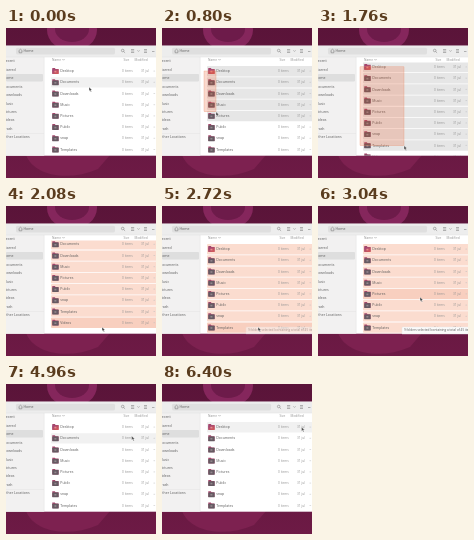
Recreate the animation shown at these times as an HTML page. Size 150 by 150 pixels, loop 6.48 s.

```html
<!DOCTYPE html>
<html lang="en">
<head>
<meta charset="utf-8">
<title>File selection</title>
<style>
  html, body { margin: 0; width: 100%; height: 100%; overflow: hidden; background: #5a1439; }
  svg { display: block; width: 100vw; height: 100vh; }
  text { font-family: "Open Sans", "Noto Sans", sans-serif; font-size: 3.5px; fill: #5a5a5a; }
  .dim { fill: #929292; font-size: 3.2px; }
  .line { fill: none; stroke: #707070; stroke-width: .5; }
</style>
</head>
<body>
<svg viewBox="0 0 150 150">
  <defs>
    <linearGradient id="wall" x2="0" y2="1">
      <stop stop-color="#5a1439"/>
      <stop offset="1" stop-color="#6d1a45"/>
    </linearGradient>
    <linearGradient id="warm" x2="1" y2="1">
      <stop stop-color="#97447a"/>
      <stop offset="1" stop-color="#dc5c55"/>
    </linearGradient>
    <clipPath id="view"><rect x="38" y="34.5" width="112" height="93"/></clipPath>
  </defs>

  <rect width="150" height="150" fill="url(#wall)"/>
  <ellipse cx="66" cy="2" rx="25" ry="21" fill="#85265c"/>
  <ellipse cx="66" cy="1" rx="17" ry="13" fill="#6d1b4a"/>
  <path d="M20 127C28 148 62 154 92 141L104 127Z" fill="#7d2150"/>

  <rect y="17.7" width="150" height="110" fill="#fff"/>
  <rect y="17.7" width="150" height="11.3" fill="#ededed"/>
  <rect y="29" width="38" height="98.7" fill="#f2f1f1"/>
  <path d="M0 29H150M38.2 29V127.7" stroke="#dcdcdc" stroke-width=".5"/>
  <g id="side"></g>

  <g clip-path="url(#view)"><g id="list"></g></g>
  <text class="dim" x="46" y="33">Name</text>
  <text class="dim" x="117.5" y="33">Size</text>
  <text class="dim" x="128.5" y="33">Modified</text>
  <path class="line" d="M56.5 31.2l1 1 1-1"/>

  <rect x="10" y="19.8" width="99" height="6.6" rx="1.5" fill="#dfdfdf"/>
  <path class="line" d="M12.5 23l2-1.8 2 1.8M13.2 22.8v2h2.6v-2"/>
  <text x="17.5" y="24.3">Home</text>
  <circle class="line" cx="116.7" cy="22.5" r="1.3"/>
  <path class="line" d="M117.7 23.5l1.4 1.4M125 21.5h3.2M125 23h3.2M125 24.5h3.2M131.5 22.4l1 1 1-1M138 21.5h3M138 23h3M138 24.5h3M146 23.5h2.5"/>

  <rect id="band" x="42" fill="#e95420" fill-opacity=".22" stroke="#e98a66" stroke-width=".3"/>
  <g id="status">
    <path d="M84 128v-6q0-1 1-1h66v7z" fill="#fafafa" stroke="#e2e2e2" stroke-width=".4"/>
    <text x="86" y="125.3" style="font-size:3.1px">9 folders selected (containing a total of 45 items)</text>
  </g>
  <path id="cursor" d="M0 0V4.2L1 3.3 1.8 5 2.6 4.6 1.8 3H3.1Z" fill="#444" stroke="#fff" stroke-width=".4"/>
</svg>
<script>
const LOOP = 6480, STEP = 80, TOP = 37.6, PITCH = 11.2;
const DRAG = 320, DROP = 1960, CLEAR = 3760;
const $ = id => document.getElementById(id);
const set = (id, attrs) => Object.entries(attrs).forEach(([k, v]) => $(id).setAttribute(k, v));

const linear = u => u;
const easeIn = u => u * u;
const easeOut = u => 1 - (1 - u) ** 2;
const smooth = u => u * u * (3 - 2 * u);
const ramp = (t, from, to, ease = linear) => ease(Math.min(1, Math.max(0, (t - from) / (to - from))));

// Each leg of the pointer's way adds its own eased offset
const pointerX = t => 83 - 41 * ramp(t, 0, DRAG, smooth)
  + 28 * ramp(t, DRAG, 1440) + 26 * ramp(t, 1440, DROP)
  + 24 * ramp(t, 2720, 3360, easeIn) - 12 * ramp(t, 3360, 3600, easeOut)
  + 31.5 * ramp(t, 3840, 5840);
const pointerY = t => 59 - 16 * ramp(t, 0, DRAG, smooth)
  + 39 * ramp(t, DRAG, 720) + 16 * ramp(t, 720, 1440) + 23 * ramp(t, 1440, DROP, easeOut)
  - 85 * ramp(t, 2720, 3520, smooth) + 7 * ramp(t, 3840, 4480)
  + 9 * Math.sin(Math.PI * ramp(t, 4560, 5440));
const scrollAt = t => 16 * (ramp(t, 1600, 2080, smooth) - ramp(t, 2160, 2480, smooth));
const statusAt = t => ramp(t, 2640, 2800) - ramp(t, 3840, 4160);

const places = ["Recent", "Starred", "Home", "Documents", "Downloads", "Music", "Pictures", "Videos", "Trash", "Other Locations"];
$("side").innerHTML = '<rect y="46" width="37" height="7.6" rx="1" fill="#dedede"/>' +
  places.map((name, i) => `<text x="-2.4" y="${34.3 + i * 8.45}">${name}</text>`).join("") +
  '<path d="M0 105.5H38" stroke="#ddd" stroke-width=".4"/>';

const folders = ["Desktop", "Documents", "Downloads", "Music", "Pictures", "Public", "snap", "Templates", "Videos"];
$("list").innerHTML = folders.map((name, i) => `
  <g transform="translate(0 ${TOP + i * PITCH})">
    <rect class="row" x="45" y=".4" width="107" height="10.4" rx="1"/>
    <path d="M46.3 2.5h2.5l.8.9h3v4.8h-6.3z" fill="#a5476c"/>
    <rect x="46.3" y="3.7" width="6.3" height="4.7" rx=".5" fill="${i ? "#655a62" : "url(#warm)"}"/>
    <rect x="48.4" y="5.2" width="2" height="1.6" fill="${i ? "#94858e" : "#e88a8a"}"/>
    <text x="54.3" y="6.7">${name}</text>
    <text class="dim" x="116" y="6.7">0 items</text>
    <text class="dim" x="135" y="6.7">31 jul</text>
    <path d="M147.5 5.5h1.6" stroke="#bbb" stroke-width=".5"/>
  </g>`).join("");
const rows = [...document.querySelectorAll(".row")];

function rowColor(selected, dragging, touched) {
  if (selected) return touched ? "#f8cfbf" : "#fbdccf";
  if (!touched) return "none";
  return dragging ? "#e6e6e6" : "#f1f1f1";
}

function draw(t) {
  const x = pointerX(t), y = pointerY(t), scroll = scrollAt(t);
  const dragging = t >= DRAG && t < DROP;
  const selected = t >= DROP && t < CLEAR;
  rows.forEach((row, i) => {
    const top = TOP + i * PITCH - scroll;
    const touched = dragging ? top + 1 < y : y > top && y < top + PITCH;
    row.setAttribute("fill", rowColor(selected, dragging, touched));
  });
  const top = 43 - scroll;
  set("list", { transform: `translate(0 ${-scroll})` });
  set("band", {
    y: top, width: Math.max(0, x - 42), height: Math.max(0, y - top),
    visibility: dragging ? "visible" : "hidden"
  });
  set("status", { opacity: statusAt(t) });
  set("cursor", { transform: `translate(${x} ${y})` });
}

const start = performance.now();
function tick(now) {
  const t = Math.max(0, now - start) % LOOP;
  draw(Math.floor(t / STEP) * STEP);
  requestAnimationFrame(tick);
}
draw(0);
requestAnimationFrame(tick);
</script>
</body>
</html>
```
